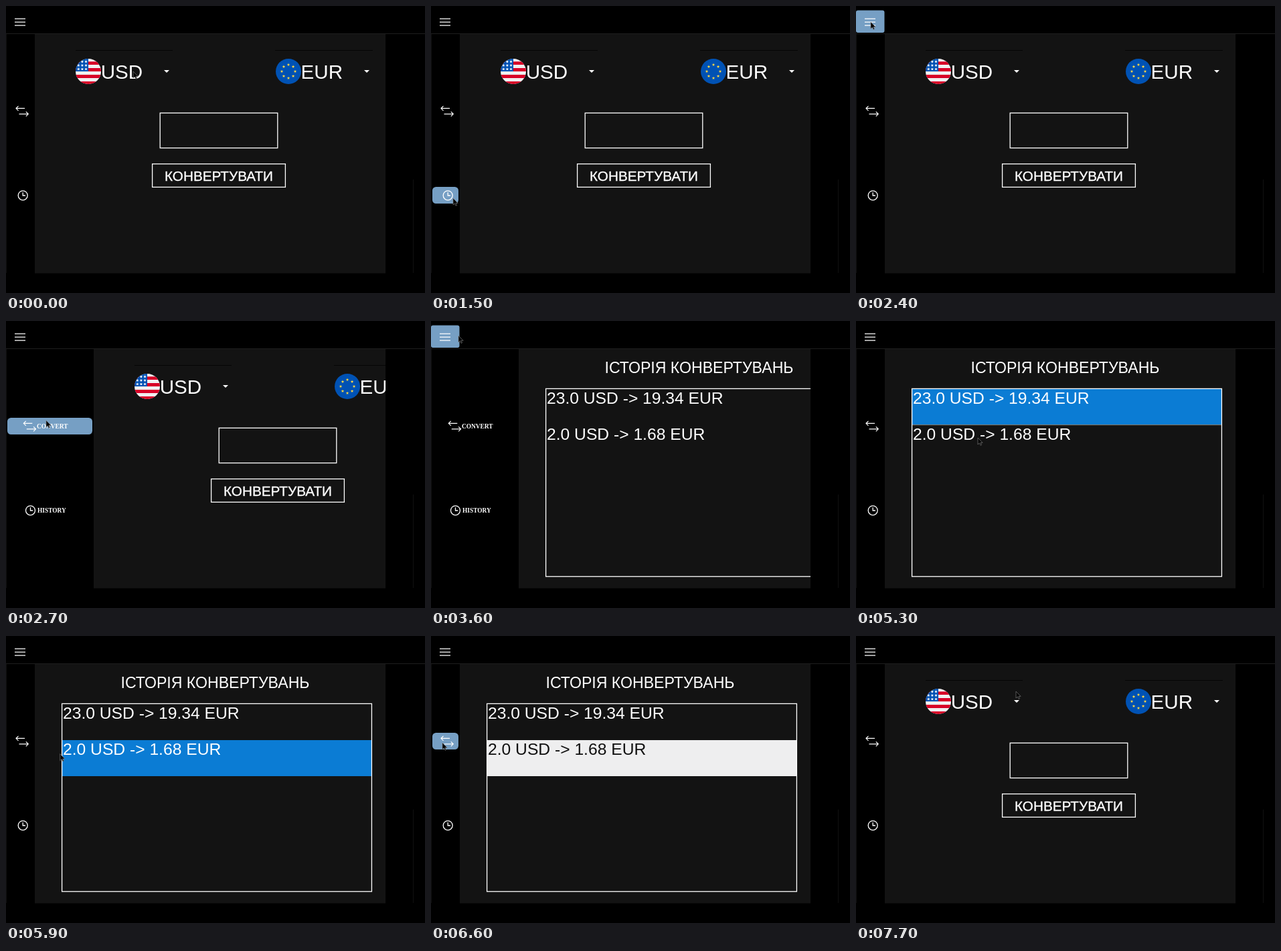
An HTML page that plays this animation: 626x430 px, repeating every 8 s.

```html
<!DOCTYPE html>
<html lang="uk">
<head>
<meta charset="utf-8">
<title>Currency converter</title>
<style>
  html, body { margin: 0; width: 100%; height: 100%; overflow: hidden; background: #000; }
  svg { display: block; width: 626px; height: 430px; }
  text { font-family: "Liberation Sans", Arial, sans-serif; fill: #fff; }
  .menu text { font: bold 9.4px "Liberation Serif", serif; }
  .line { fill: none; stroke: #fff; stroke-width: 1.3; }
  .code { font-size: 29.6px; }
  .row { font-size: 24.65px; }
  .hover { fill: #769fc4; }
</style>
</head>
<body>
<svg viewBox="0 0 626 430">
  <defs>
    <clipPath id="panelClip"><rect x="0" y="42" width="567" height="359"/></clipPath>
    <clipPath id="disc"><circle r="19"/></clipPath>
    <path id="star"/>
  </defs>
  <rect width="626" height="430" fill="#000"/>
  <path d="M0 41.5H626" stroke="#1e1e1e"/>
  <path d="M.5 42V400M608.5 260V400" stroke="#111"/>

  <g clip-path="url(#panelClip)">
    <g id="panel">
      <rect x="43" y="42" width="612" height="358.5" fill="#131313"/>
      <g id="convertPage">
        <path d="M104 66.5H249M402 66.5H548" stroke="#050505"/>
        <g transform="translate(123 98)">
          <g clip-path="url(#disc)">
            <rect x="-19" y="-19" width="38" height="38" fill="#f0f0f0"/>
            <path d="M-19-12.4h38M-19-2.5h38M-19 7.4h38M-19 17.4h38" stroke="#d80027" stroke-width="4.95"/>
            <rect x="-19" y="-19" width="19" height="19" fill="#0052b4"/>
            <g id="usStars" fill="#fff"></g>
          </g>
        </g>
        <g transform="translate(422 98)">
          <circle r="19" fill="#0052b4"/>
          <g id="euStars" fill="#ffda44"></g>
        </g>
        <text class="code" x="141.7" y="109">USD</text>
        <text class="code" x="440.6" y="109">EUR</text>
        <path d="M236 96h8l-4 4zM535 96h8l-4 4z" fill="#fff"/>
        <rect class="line" x="230.2" y="160.3" width="175.6" height="52.4"/>
        <rect class="line" x="218.6" y="236.6" width="198.8" height="34.8"/>
        <text x="318" y="261.5" font-size="20.7" text-anchor="middle" stroke="#fff" stroke-width=".35">КОНВЕРТУВАТИ</text>
      </g>
      <g id="historyPage">
        <text x="312.5" y="78" font-size="23.1" text-anchor="middle">ІСТОРІЯ КОНВЕРТУВАНЬ</text>
        <rect id="selection" x="84" width="462.5" height="54"/>
        <path id="selectionEdge" d="M84 155.7H546" stroke="#8a7a68"/>
        <text class="row" x="85" y="124">23.0 USD -&gt; 19.34 EUR</text>
        <text class="row" id="secondRow" x="85" y="178">2.0 USD -&gt; 1.68 EUR</text>
        <rect class="line" x="83.6" y="101.4" width="462.8" height="281.4"/>
      </g>
    </g>
  </g>

  <g class="menu">
    <rect class="hover" id="menuHover" x="0" y="6.5" width="42.5" height="33.5" rx="3"/>
    <rect class="hover" id="convertHover" x="2" y="145" height="25" rx="5.5"/>
    <rect class="hover" id="historyHover" x="2" y="271" height="25" rx="5.5"/>
    <path class="line" d="M13 19.2H29M13 24.2H29M13 29.2H29"/>
    <g id="icons">
      <path class="line" style="stroke-width:1.15" d="M28 153.3H15M18.5 149.8L15 153.3L18.5 156.8M19.5 161.8H33.3M29.8 158.3L33.3 161.8L29.8 165.3"/>
      <circle class="line" cx="25.2" cy="283.8" r="7"/>
      <path class="line" d="M25.2 279.3V284H29"/>
    </g>
    <g id="labels">
      <text x="46" y="161">CONVERT</text>
      <text x="47" y="287.3">HISTORY</text>
    </g>
  </g>
  <path id="cursor" d="M0 0V10L2.4 7.9L4 11.3L5.6 10.6L4.1 7.4H7.2Z" fill="#050505" stroke="#8a8a8a" stroke-width=".6"/>
</svg>
<script>
const LOOP = 8000, STEP = 100, SHIFT = 88;
const $ = id => document.getElementById(id);
const show = (id, on) => { $(id).style.display = on ? '' : 'none'; };
const move = (id, x, y) => $(id).setAttribute('transform', `translate(${x} ${y})`);

// time, x, y of the pointer tip
const path = [
  [0, 190, 98], [500, 33, 177], [600, 33, 177], [1100, 30, 282], [1500, 33, 288],
  [2000, 30, 130], [2300, 22, 24], [2500, 22, 24], [2700, 60, 149], [3000, 62, 282],
  [3200, 62, 282], [3600, 41, 22], [3800, 25, 24], [4000, 25, 24], [4200, 62, 44],
  [4800, 190, 130], [5000, 190, 132], [5300, 182, 175], [5600, 182, 180], [6000, 62, 176],
  [6300, 17, 160], [6700, 17, 160], [7300, 321, 109], [7400, 226, 86], [7500, 226, 86],
  [7700, 239, 83], [LOOP, 239, 83]
];

function pointerAt(t) {
  const i = path.findIndex(p => p[0] > t);
  const [t0, x0, y0] = path[i - 1], [t1, x1, y1] = path[i];
  const k = (t - t0) / (t1 - t0), e = k * k * (3 - 2 * k);
  return [x0 + (x1 - x0) * e, y0 + (y1 - y0) * e];
}

function starPath(r) {
  const points = Array.from({ length: 10 }, (_, i) => {
    const a = i * Math.PI / 5, d = i % 2 ? r * 0.42 : r;
    return `${(d * Math.sin(a)).toFixed(2)} ${(-d * Math.cos(a)).toFixed(2)}`;
  });
  return `M${points.join('L')}Z`;
}

function addStar(group, x, y) {
  $(group).insertAdjacentHTML('beforeend', `<use href="#star" x="${x}" y="${y}"/>`);
}

$('star').setAttribute('d', starPath(2.4));
for (let i = 0; i < 8; i++) {
  const a = i * Math.PI / 4;
  addStar('euStars', 10 * Math.sin(a), -10 * Math.cos(a));
}
for (let row = 0; row < 3; row++)
  for (let col = 0; col < 3; col++) addStar('usStars', -3.5 - col * 5.6, -3.4 - row * 5.6);

function draw(t) {
  const [x, y] = pointerAt(t);
  const open = t >= 2500 && t < 3900;
  const history = t >= 3200 && t < 6700;
  const firstSelected = t >= 4900 && t < 5500;
  const secondSelected = t >= 5500;
  const unfocused = t >= 6500;
  const barWidth = open ? 127 : 39;
  const inside = (right, top, bottom) => x <= right && y >= top && y <= bottom;

  move('panel', open ? SHIFT : 0, 0);
  move('icons', open ? 11.3 : 0, 0);
  move('cursor', x, y);
  show('labels', open);
  show('convertPage', !history);
  show('historyPage', history);

  show('selection', firstSelected || secondSelected);
  show('selectionEdge', firstSelected);
  $('selection').setAttribute('y', secondSelected ? 156 : 102);
  $('selection').setAttribute('fill', unfocused ? '#eeeeef' : '#0b7cd4');
  $('secondRow').style.fill = unfocused ? '#111' : '#fff';

  $('convertHover').setAttribute('width', barWidth);
  $('historyHover').setAttribute('width', barWidth);
  show('menuHover', inside(42, 6, 40));
  show('convertHover', inside(barWidth + 2, 145, 170));
  show('historyHover', inside(barWidth + 2, 271, 296));
}

const start = performance.now();
function tick() {
  const t = (performance.now() - start) % LOOP;
  draw(Math.floor(t / STEP) * STEP);
  requestAnimationFrame(tick);
}
tick();
</script>
</body>
</html>
```
